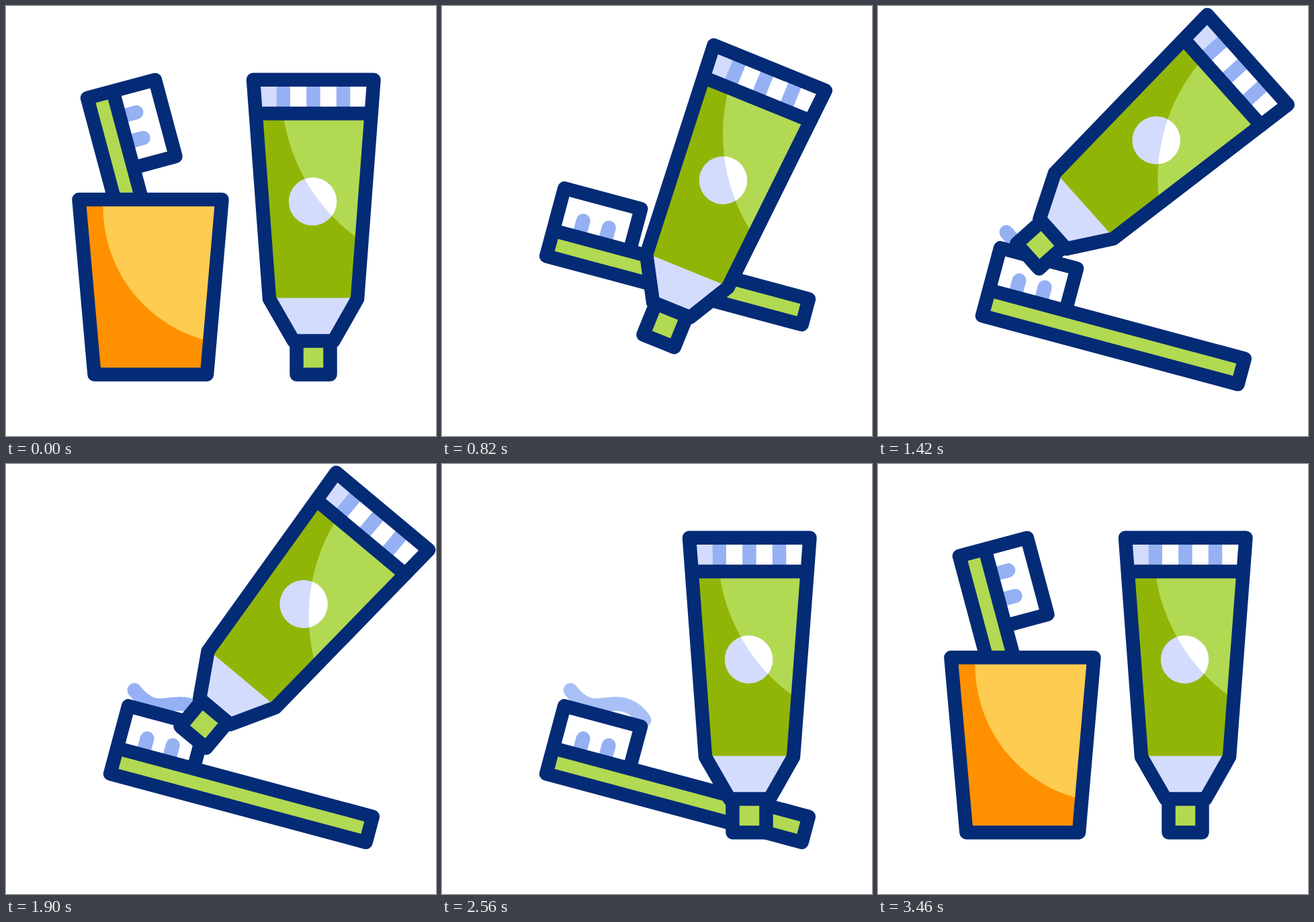
An HTML page for the animation above (3620 ms loop, 640 by 640 pixels).

```html
<!DOCTYPE html>
<html lang="en">
<head>
<meta charset="utf-8">
<title>Toothbrush and paste</title>
<style>
  html, body { margin: 0; width: 100%; height: 100%; overflow: hidden; background: #fff; }
  svg { display: block; width: 100vw; height: 100vh; }
  .line { fill: none; stroke: #042b76; stroke-width: 20.5; stroke-linejoin: round; stroke-linecap: round; }
  .soft { fill: none; stroke: #95b1f4; stroke-width: 21; stroke-linecap: round; }
</style>
</head>
<body>
<svg viewBox="0 0 640 640">
  <defs>
    <clipPath id="cupClip"><path d="M108 288H321L299 548H131Z"/></clipPath>
    <clipPath id="bodyClip"><path d="M372 160H544L523 436H392Z"/></clipPath>
    <clipPath id="bandClip"><path d="M368 110H547L543 160H372Z"/></clipPath>
    <clipPath id="dotClip"><circle cx="456.5" cy="291" r="35.7"/></clipPath>
  </defs>

  <path id="paste" class="soft" pathLength="1" d="M191 336.5C203 352 217 362 237 359C257 356 281 352 301 381"/>

  <!-- handle corner at 0,0, handle along x -->
  <g id="brush">
    <path d="M0-104.5H118V-39H0Z" fill="#fff"/>
    <path d="M39.5-65V-39M79-65V-39" class="soft"/>
    <path d="M0-39.5H394V0H0Z" fill="#b2d952"/>
    <path d="M0-39.5H394V0H0V-104.5H118V-39.5" class="line"/>
  </g>

  <g id="cup">
    <g clip-path="url(#cupClip)">
      <path d="M100 280H330V560H100Z" fill="#ff9100"/>
      <circle cx="350" cy="299" r="205.5" fill="#fecc50"/>
    </g>
    <path d="M108.5 288H321.5L299 548.5H131.5Z" class="line"/>
  </g>

  <g id="tube">
    <g clip-path="url(#bandClip)">
      <path d="M360 100H560V165H360Z" fill="#fff"/>
      <path d="M360 100H402.5V165H360Z" fill="#d3dcfc"/>
      <path d="M402.5 100h20.5v65h-20.5zM447.2 100h20.5v65h-20.5zM491.8 100h20.5v65h-20.5z" fill="#95b1f4"/>
    </g>
    <g clip-path="url(#bodyClip)">
      <path d="M360 155H560V440H360Z" fill="#91b507"/>
      <circle cx="683" cy="124.7" r="272.8" fill="#b2d952"/>
    </g>
    <g clip-path="url(#dotClip)">
      <path d="M420 250H500V330H420Z" fill="#d3dcfc"/>
      <circle cx="683" cy="124.7" r="272.8" fill="#fff"/>
    </g>
    <path d="M392 434.5H523L488 498H428Z" fill="#d3dcfc"/>
    <path d="M432.5 498.5H482.5V548.5H432.5Z" fill="#b2d952"/>
    <path d="M368 109.8H547.5L523 436L487.5 498.5H428L392 436ZM372 160H544M432.5 498.5H482.5V548.5H432.5Z" class="line"/>
  </g>
</svg>
<script>
const LOOP = 3620;
const el = id => document.getElementById(id);
const brush = el('brush'), cup = el('cup'), tube = el('tube'), paste = el('paste');

// eased progress of t between two times
const ease = (t, from, to) => {
  const p = Math.min(1, Math.max(0, (t - from) / (to - from)));
  return p * p * (3 - 2 * p);
};
const mix = (a, b, s) => a + (b - a) * s;
const line = (a, b, s) => a.map((v, i) => mix(v, b[i], s));
// curved travel with one control point; the angle is mixed evenly
const arc = (a, c, b, s) => {
  const at = i => (1 - s) ** 2 * a[i] + 2 * s * (1 - s) * c[i] + s * s * b[i];
  return [at(0), at(1), mix(a[2], b[2], s)];
};
const place = (node, [x, y, angle], cx, cy) =>
  node.setAttribute('transform',
    `translate(${x.toFixed(2)} ${y.toFixed(2)}) rotate(${angle.toFixed(3)}) translate(${-cx} ${-cy})`);

// poses: centre x, centre y, angle
const B = { rest: [222.2, 313.8, 75], out: [359, 308, 15], low: [358.8, 461.8, 15], high: [199.4, 228.8, 75] };
const T = { rest: [457.5, 329, 0], start: [370.4, 220, 52.2], end: [419.5, 238.3, 39.9] };

function brushPose(t) {
  if (t < 570) return arc(B.rest, [349.5, 154], B.out, ease(t, 0, 565));
  if (t < 2740) return line(B.out, B.low, ease(t, 570, 1130));
  if (t < 3110) return line(B.low, B.high, ease(t, 2740, 3110));
  return line(B.high, B.rest, ease(t, 3110, 3460));
}

function tubePose(t) {
  if (t < 1130) return arc(T.rest, [382, 299.4], T.start, ease(t, 570, 1130));
  if (t < 1900) return line(T.start, T.end, ease(t, 1130, 1890));
  return arc(T.end, [427, 284], T.rest, ease(t, 1900, 2450));
}

function draw(t) {
  place(brush, brushPose(t), 197, -52);
  place(tube, tubePose(t), 457.5, 329);

  const away = ease(t, 0, 565) - ease(t, 2740, 3450);
  place(cup, [215 + 614 * away, 418 + 49 * away, -60 * away], 215, 418);

  const squeezed = ease(t, 1130, 1890);
  const alpha = squeezed > 0 ? 1 - ease(t, 2490, 2740) : 0;
  paste.setAttribute('stroke-dasharray', `${squeezed.toFixed(4)} 2`);
  paste.setAttribute('opacity', alpha.toFixed(3));
}

const begin = performance.now();
function tick() {
  draw((performance.now() - begin) % LOOP);
  requestAnimationFrame(tick);
}
draw(0);
requestAnimationFrame(tick);
</script>
</body>
</html>
```
